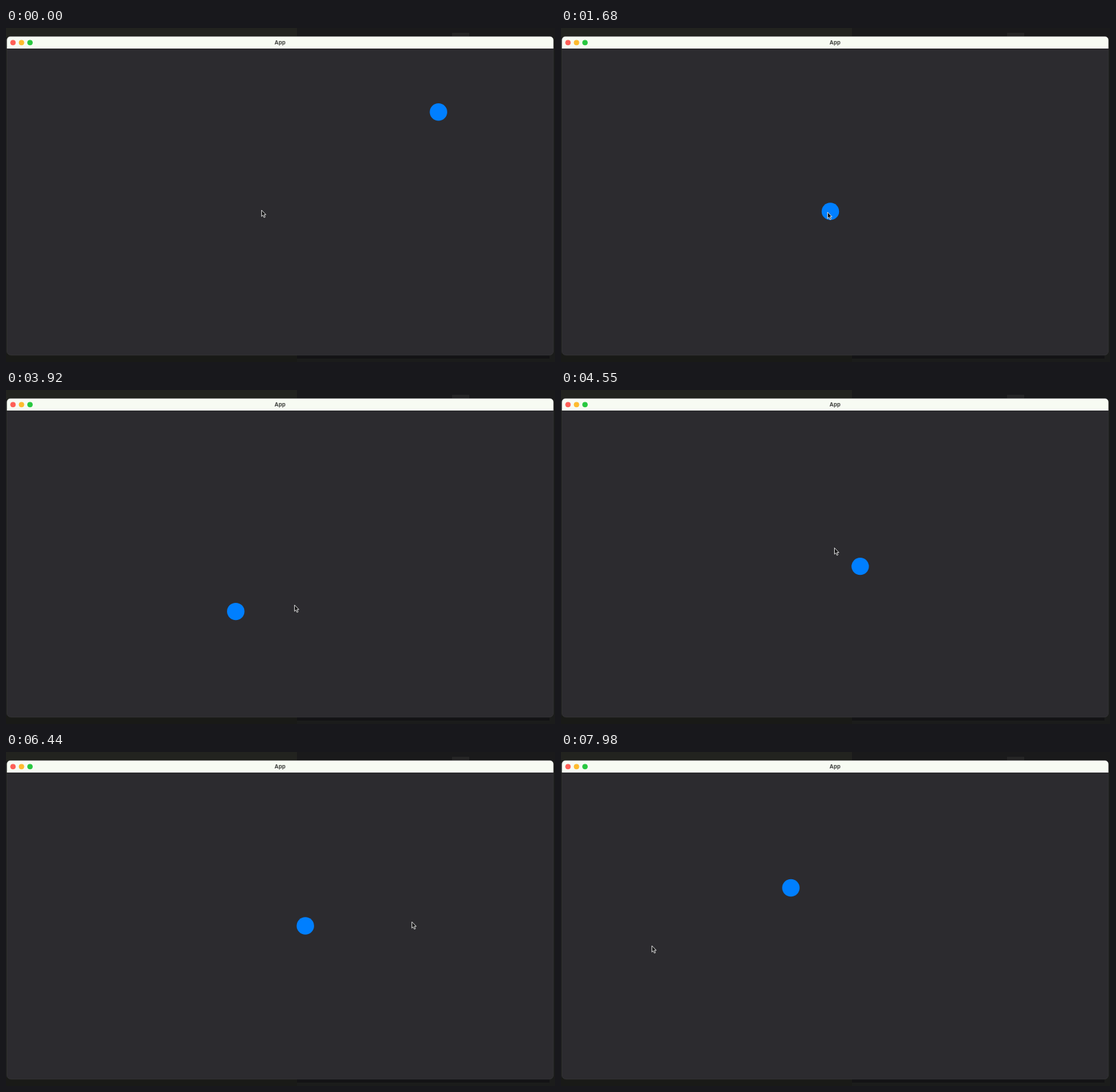
An HTML page for the animation above (8 s loop, 800 by 488 pixels).

```html
<!DOCTYPE html>
<html lang="en">
<head>
<meta charset="utf-8">
<title>App</title>
<style>
  html, body { margin: 0; width: 100%; height: 100%; overflow: hidden; background: #1d1e1c; }
  svg { display: block; width: 100%; height: 100%; }
  text { font: 700 8px Inter, Arial, sans-serif; fill: #454744; text-anchor: middle; }
</style>
</head>
<body>
<svg viewBox="0 0 800 488">
  <!-- desktop behind the window -->
  <rect width="800" height="488" fill="#1b1c1b"/>
  <rect width="424" height="14" fill="#22231f"/>
  <rect x="424" width="376" height="14" fill="#1a1a1b"/>
  <rect x="650" y="7" width="25" height="6" fill="#252525"/>
  <rect y="476" width="424" height="12" fill="#191a17"/>
  <rect x="424" y="476" width="368" height="7" fill="#131315"/>

  <!-- window -->
  <rect x="1.3" y="12.500" width="796.400" height="465.500" rx="6" fill="#2c2b2f" stroke="#3b3b3d" stroke-width=".6"/>
  <path d="M1.300 30V17.500a5 5 0 0 1 5-5H792.700a5 5 0 0 1 5 5V30Z" fill="#f7fbf3"/>
  <circle cx="10.200" cy="21.300" r="3.900" fill="#fe5f57"/>
  <circle cx="22.600" cy="21.300" r="3.900" fill="#febb2e"/>
  <circle cx="35" cy="21.300" r="3.900" fill="#28c840"/>
  <text x="399.300" y="24">App</text>

  <circle id="ball" r="12.700" fill="#007fff"/>
  <path id="cursor" d="M-.600 0V9.300L1.500 7.400L3 10.900L4.600 10.200L3.100 6.800H5.900Z"
        fill="#111" stroke="#e8e8e8" stroke-width=".9" stroke-linejoin="round"/>
</svg>
<script>
const LOOP = 8000, STEP = 70;
const CHASE_START = 2520, SPRING = 5;
const launch = [630.2, 122.8], rest = [392, 268.2];

// Turning points of each path: [time in ms, x, y].
const cursorPath = [
  [0, 373, 266], [1400, 389, 269], [CHASE_START, 389, 269], [2870, 296, 261],
  [3220, 205, 288], [3920, 421, 314], [4200, 466, 288], [4760, 345, 212],
  [5250, 260, 244], [6440, 592, 248], [7140, 460, 95], [7560, 248, 180], [7980, 133, 283]
];
const ballPath = [
  [CHASE_START, ...rest], [2870, 346, 273.6], [3290, 268, 298], [3920, 334.8, 323.6],
  [4410, 440, 285], [4830, 412, 206], [5250, 309.4, 224.3], [5530, 286, 246],
  [6440, 436.2, 254], [6860, 497, 235], [7420, 440, 176], [7980, 335, 198.5]
];

const slope = (a, b, axis) => (b[axis] - a[axis]) / (b[0] - a[0]);

// Harmonic mean of the neighbouring slopes: smooth, without overshoot.
function tangent(path, i, axis) {
  if (i === 0 || i === path.length - 1) return 0;
  const before = slope(path[i - 1], path[i], axis), after = slope(path[i], path[i + 1], axis);
  return before * after > 0 ? 2 * before * after / (before + after) : 0;
}

function follow(path, time) {
  const i = Math.max(0, path.findIndex(point => point[0] >= time) - 1);
  const a = path[i], b = path[i + 1];
  const span = b[0] - a[0], u = (time - a[0]) / span, v = 1 - u;
  return [1, 2].map(axis =>
    v * v * (1 + 2 * u) * a[axis] + u * u * (3 - 2 * u) * b[axis]
    + span * u * v * (v * tangent(path, i, axis) - u * tangent(path, i + 1, axis)));
}

// Critically damped spring from the launch point to rest.
function settle(time) {
  const wt = SPRING * time / 1000, left = (1 + wt) * Math.exp(-wt);
  return rest.map((end, axis) => end + (launch[axis] - end) * left);
}

const place = (id, point) =>
  document.getElementById(id).setAttribute("transform", `translate(${point})`);

function draw() {
  const time = Math.floor(performance.now() % LOOP / STEP) * STEP;
  place("ball", time < CHASE_START ? settle(time) : follow(ballPath, time));
  place("cursor", follow(cursorPath, time));
  requestAnimationFrame(draw);
}
draw();
</script>
</body>
</html>
```
